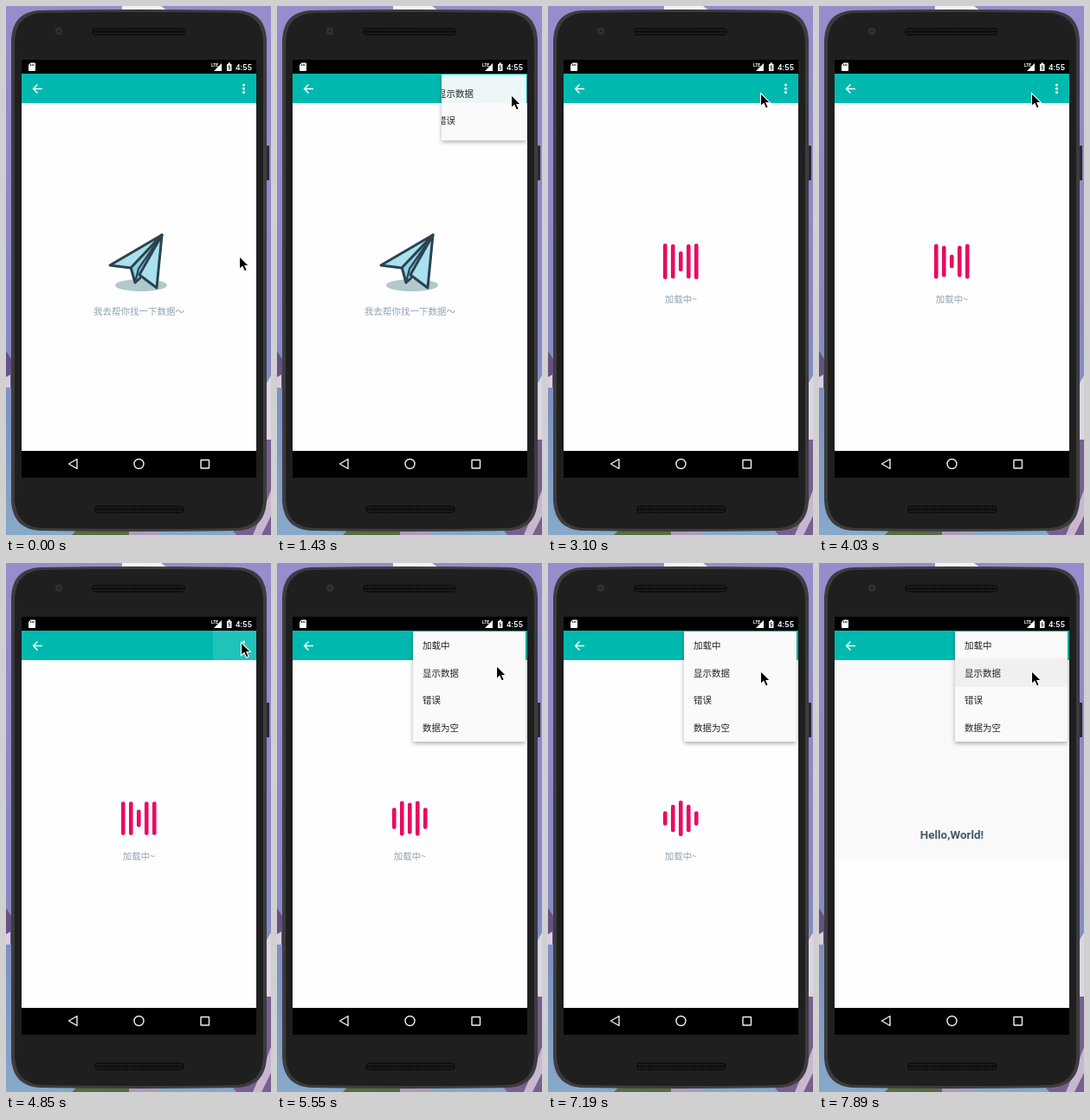
An HTML page that plays this animation: 306x610 px, repeating every 8 s.

```html
<!DOCTYPE html>
<html lang="zh-CN">
<head>
<meta charset="utf-8">
<style>
  html, body { margin: 0; width: 100%; height: 100%; overflow: hidden; }
  svg { display: block; }
  text { font: 10.5px "Noto Sans CJK SC", "Noto Sans CJK", sans-serif; }
  .hint { fill: #90a3b1; text-anchor: middle; }
  #items text { fill: #222; }
  #popup { filter: drop-shadow(0 2px 2.5px rgba(0, 0, 0, .32)); }
</style>
</head>
<body>
<svg id="stage" width="306" height="610" viewBox="0 0 306 610">
  <defs>
    <linearGradient id="sky" x2="0" y2="1">
      <stop offset="0" stop-color="#978dcc"/>
      <stop offset=".6" stop-color="#8b87c8"/>
      <stop offset=".78" stop-color="#7e93c2"/>
      <stop offset="1" stop-color="#86a9c9"/>
    </linearGradient>
  </defs>

  <!-- wallpaper -->
  <rect width="306" height="610" fill="url(#sky)"/>
  <path d="M134 0h45l8 6h-53z" fill="#f5f3f6"/>
  <path d="M0 398l8 12v30H0z" fill="#655184"/>
  <path d="M0 428l5-3v15H0z" fill="#d8cfe4"/>
  <path d="M306 426l-8 14v65h8z" fill="#ddd5df"/>
  <path d="M306 500h-8v85l-36 20 4 5h40z" fill="#77608f"/>
  <path d="M306 558l-9 24-12 28h10l11-22z" fill="#c9b7cf"/>
  <path d="M76 610l8-8h58v8z" fill="#586c43"/>
  <path d="M142 602h30l8 8h-38z" fill="#ad9bbd"/>

  <!-- handset -->
  <rect x="300" y="161" width="4" height="40" rx="1" fill="#29292b"/>
  <path d="M40 5Q153 3 267 5C289 6 300 17 301 40V570C300 592 289 604 267 605Q153 607 40 605C18 604 7 592 6 570V40C7 17 18 6 40 5Z" fill="#3c3c3e"/>
  <path d="M42 8Q153 6 265 8C286 9 296 20 297 42V568C296 590 286 601 265 602Q153 604 42 602C21 601 11 590 10 568V42C11 20 21 9 42 8Z" fill="#1f1f20"/>
  <circle cx="61" cy="29" r="4" fill="#343436"/>
  <circle cx="61" cy="29" r="2" fill="#242427"/>
  <g fill="#101010">
    <rect x="99" y="25" width="108" height="9" rx="4.5"/>
    <rect x="102" y="576" width="104" height="9" rx="4.5"/>
  </g>
  <path d="M102 27.5H205M102 31.5H205M105 578.5H204M105 582.5H204" stroke="#303030" stroke-dasharray="1.5 1.5"/>

  <!-- screen -->
  <rect x="18" y="62" width="271" height="482"/>
  <rect x="18" y="78" width="271" height="34" fill="#00b9ae"/>
  <rect x="18" y="112" width="271" height="401" fill="#fefefe"/>
  <g fill="#fff">
    <path d="M28.5 65.5H33a1 1 0 0 1 1 1V74a1 1 0 0 1-1 1H27a1 1 0 0 1-1-1V68z"/>
    <path d="M249 66v9h-9z"/>
    <path d="M255 67h1.5v-1.5h2.5V67h1.5v8H255z"/>
    <text x="237" y="70" style="font:bold 5px Roboto,sans-serif">LTE</text>
    <text x="265" y="73.5" style="font:500 9.7px Roboto,sans-serif">4:55</text>
  </g>
  <path d="M28.5 67v2M30.3 67v2M32 67v2M258.3 68l-1.5 3h2l-1.4 3" fill="none" stroke="#000" stroke-width=".8"/>
  <path d="M42 95.500H32M36.500 90.500l-5 5 5 5" fill="none" stroke="#fff" stroke-width="1.4"/>
  <rect id="press" x="239" y="78" width="50" height="34" fill="#fff" opacity=".13"/>
  <g fill="#fff">
    <circle cx="274.500" cy="91" r="1.500"/>
    <circle cx="274.500" cy="95.200" r="1.500"/>
    <circle cx="274.500" cy="99.400" r="1.500"/>
  </g>
  <g fill="none" stroke="#f2f2f2" stroke-width="1.400">
    <path d="M82 522.500v11l-9.500-5.500z" stroke-linejoin="round"/>
    <circle cx="153.500" cy="528" r="5.500"/>
    <rect x="225" y="523.500" width="9.500" height="9.500" rx=".5"/>
  </g>

  <!-- pages -->
  <g id="empty">
    <ellipse cx="156" cy="322" rx="30" ry="7" fill="#b1c9cb"/>
    <g fill="#a9e1ee" stroke="#2b4350" stroke-width="3" stroke-linejoin="round">
      <path d="M180 264L144 301 149 319 158 311z" fill="#8fcfdf"/>
      <path d="M180 264L120 299 144 302z"/>
      <path d="M180 264L154 310 174 325z"/>
      <path d="M149 319L153 303 180 264" fill="none" stroke-width="2.200"/>
    </g>
    <text class="hint" x="153.500" y="356">我去帮你找一下数据～</text>
  </g>
  <g id="loading">
    <g id="bars" fill="#ea0a62"></g>
    <text class="hint" x="153.500" y="341.500">加载中~</text>
  </g>
  <g id="hello">
    <rect x="18" y="112" width="271" height="231" fill="#f9f9f9"/>
    <text x="153.500" y="317.500" text-anchor="middle" fill="#455a66" style="font:bold 13.4px Roboto,sans-serif">Hello,World!</text>
  </g>

  <g id="popup">
    <svg id="clip" y="79">
      <rect width="130" height="127" rx="1" fill="#fafafa"/>
      <g id="items"><rect id="mark" width="130" height="33" fill="#f0f0f0"/></g>
    </svg>
  </g>

  <path id="cursor" d="M0 0V15.200L3.500 12 6 17.500 8.800 16.300 6.400 11H11z" stroke="#fff" stroke-width="1.100"/>
</svg>
<script>
const $ = id => document.getElementById(id);
const set = (el, attrs) => { for (const k in attrs) el.setAttribute(k, attrs[k]); };
const add = (parent, tag, attrs) => {
  const el = document.createElementNS("http://www.w3.org/2000/svg", tag);
  set(el, attrs);
  return parent.appendChild(el);
};
const show = (id, on) => { $(id).style.display = on ? "" : "none"; };
const clamp = v => Math.max(0, Math.min(1, v));

const LOOP = 8000, LOAD = 2750, DONE = 7890;
const delays = [500, 250, 0, 250, 500];

// time, x, y of the pointer tip
const pointer = [
  [0, 269, 288], [120, 260, 203], [360, 262, 165], [480, 266, 130], [590, 269, 108], [710, 270, 102],
  [2030, 257, 102], [2150, 245, 100],
  [4140, 250, 99], [4260, 257, 96], [4380, 268, 92], [4500, 271, 91],
  [5320, 269, 95], [5440, 262, 106], [5550, 253, 118], [5670, 246, 125], [6020, 245, 124]
];
// time, how far the menu still has to unfold, opacity
const menu = [
  [0, 0, 0], [1430, 1, .95], [1550, .3, 1], [1670, 0, 1],
  [2870, 0, .4], [2980, 0, 0], [4960, .5, .97], [5080, 0, 1]
];
const at = (keys, t) => keys.filter(k => k[0] <= t).pop();

const bars = delays.map((d, i) => add($("bars"), "rect", { x: 133 + i * 9, width: 4.6, rx: 2 }));
["加载中", "显示数据", "错误", "数据为空"].forEach((label, i) =>
  add($("items"), "text", { x: 11, y: 20 + i * 31.5 }).textContent = label);

const snap = t => LOAD + Math.floor((t - LOAD) / 116.8 + .1) * 116.8;

function barScale(time) {
  if (time < 0) return 1;
  const eased = (1 - Math.cos(Math.PI * (time % 900) / 900)) / 2;
  return 1 - .7 * (1 - Math.abs(1 - 2 * eased));
}

function draw(t) {
  show("empty", t < LOAD);
  show("loading", t >= LOAD && t < DONE);
  show("hello", t >= DONE);
  show("press", t >= 4730 && t < 5080);

  const s = snap(t), run = s - 2760 + 82 * clamp((s - 3100) / 1750);
  bars.forEach((bar, i) => {
    const h = 41 * barScale(run - delays[i]);
    set(bar, { y: 294.5 - h / 2, height: h });
  });

  const [, fold, opacity] = at(menu, t);
  show("popup", opacity > 0);
  set($("popup"), { opacity });
  set($("clip"), { x: 157 + 33 * fold, width: 130 - 32 * fold, height: 127 - 51 * fold });
  set($("items"), { transform: `translate(${-16 * fold} ${-26 * fold})` });
  show("mark", t >= DONE || (t >= LOAD && t < 2980));
  set($("mark"), { y: t >= DONE ? 31 : 0 });

  const [, x, y] = at(pointer, t);
  set($("cursor"), { transform: `translate(${x + .5} ${y + .5})` });
}

const start = performance.now();
function tick() {
  draw((performance.now() - start) % LOOP);
  requestAnimationFrame(tick);
}
tick();
</script>
</body>
</html>
```
